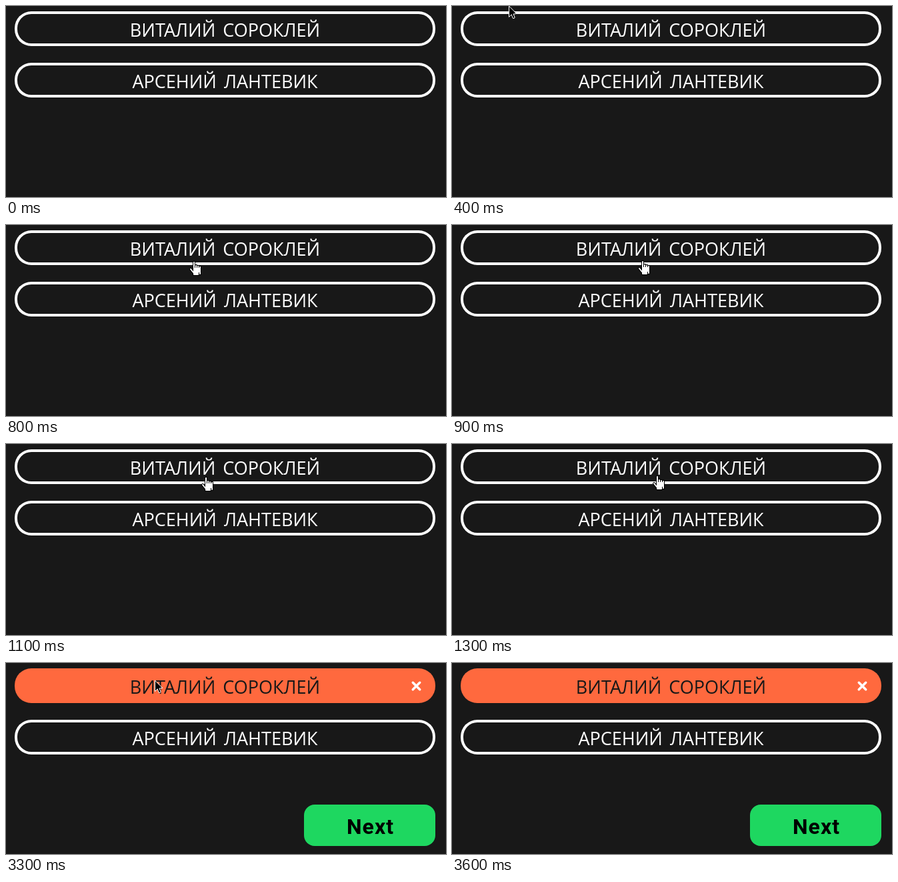
Recreate the animation shown at these times as an HTML page with a canvas. Size 660x286 px, loop 4000 ms.

```html
<!DOCTYPE html>
<html lang="ru">
<head>
<meta charset="utf-8">
<title>Quiz choice</title>
<style>
  html, body { margin: 0; width: 100%; height: 100%; overflow: hidden; background: #181818; }
  canvas { display: block; }
</style>
</head>
<body>
<canvas id="stage" width="660" height="286"></canvas>
<script>
const ctx = document.getElementById('stage').getContext('2d');
const LOOP = 4000, STEP = 100, PICKED = 1600;
const DARK = '#181818', WHITE = '#fff', BLACK = '#000', ORANGE = '#ff693e', GREEN = '#1ed760';

function fillBox(x, y, w, h, r, color) {
  ctx.beginPath();
  ctx.roundRect(x, y, w, h, r);
  ctx.fillStyle = color;
  ctx.fill();
}

function line(x1, y1, x2, y2, width, color) {
  ctx.beginPath();
  ctx.moveTo(x1, y1);
  ctx.lineTo(x2, y2);
  ctx.lineCap = 'round';
  ctx.lineWidth = width;
  ctx.strokeStyle = color;
  ctx.stroke();
}

function label(text, x, y, font, color) {
  ctx.font = font;
  ctx.fillStyle = color;
  ctx.textAlign = 'center';
  ctx.fillText(text, x, y);
}

function choice(text, y, picked) {
  fillBox(13, y, 631, 52, 25, picked ? ORANGE : WHITE);
  if (!picked) fillBox(17, y + 4, 623, 44, 21, DARK);
  ctx.wordSpacing = '4px';
  label(text, 328.5, y + 38, '500 27px "Open Sans", "Noto Sans", sans-serif', picked ? DARK : WHITE);
  ctx.wordSpacing = '0px';
}

function closeIcon(x, y, r) {
  line(x - r, y - r, x + r, y + r, 3.6, WHITE);
  line(x + r, y - r, x - r, y + r, 3.6, WHITE);
}

function nextButton() {
  fillBox(447, 212, 197, 62, 16, GREEN);
  ctx.letterSpacing = '1px';
  label('Next', 546.5, 256, 'bold 32px Roboto, sans-serif', BLACK);
  ctx.letterSpacing = '0px';
}

function arrow() {
  line(5.5, 12, 7.5, 17, 4, WHITE);
  ctx.beginPath();
  ctx.moveTo(.5, .5);
  ctx.lineTo(.5, 16.5);
  ctx.lineTo(4.5, 12.5);
  ctx.lineTo(11.5, 11.5);
  ctx.closePath();
  ctx.fillStyle = BLACK;
  ctx.fill();
  ctx.lineWidth = 1;
  ctx.strokeStyle = WHITE;
  ctx.stroke();
  line(5, 11, 7.5, 17, 2, BLACK);
}

const fingerTop = i => i ? 4 + i : 0;

function handShape(inset, color) {
  const part = (x, y, w, h) =>
    fillBox(x + inset, y + inset, w - 2 * inset, h - 2 * inset, 1, color);
  for (let i = 0; i < 4; i++) part(5 + 3 * i, fingerTop(i), 4, 14);
  part(5, 9, 12, 9);
  part(5, 13, 10, 9);
  line(2, 12, 6, 17, 4 - 2 * inset, color);
}

function hand() {
  ctx.translate(-5, 0);
  handShape(0, BLACK);
  handShape(1, WHITE);
  ctx.fillStyle = BLACK;
  for (let i = 1; i < 4; i++) ctx.fillRect(5 + 3 * i, fingerTop(i), 1, 10 - fingerTop(i));
}

const mix = (a, b, k) => a + (b - a) * k;
const easeOut = (k, power) => 1 - (1 - k) ** power;

// Hot spot of the pointer, or null while it is off the stage.
function pointerAt(t) {
  const part = (from, to) => Math.min(1, (t - from) / (to - from));
  if (t < 400 || t >= 3600) return null;
  if (t < 1000) {
    const k = easeOut(part(400, 900), 2.5);
    return [mix(85, 284, k), mix(0, 53, k) + 86 * k * (1 - k)];
  }
  if (t < 3300) {
    const k = easeOut(part(900, 1300), 1.5);
    return [mix(284, 306, k), mix(53, 47, k)];
  }
  const k = part(3300, 3500);
  return [mix(223, 138, k), mix(26, -8, k)];
}

function pointer(t, picked) {
  const spot = pointerAt(Math.floor(t / STEP) * STEP);
  if (!spot) return;
  const [x, y] = spot.map(Math.round);
  ctx.save();
  ctx.translate(x, y);
  if (picked || y < 8) arrow();
  else hand();
  ctx.restore();
}

function draw(now) {
  const t = now % LOOP;
  const picked = t >= PICKED;
  ctx.fillStyle = DARK;
  ctx.fillRect(0, 0, 660, 286);
  choice('ВИТАЛИЙ СОРОКЛЕЙ', 8, picked);
  choice('АРСЕНИЙ ЛАНТЕВИК', 85, false);
  if (picked) {
    closeIcon(615.5, 34.5, 5.2);
    nextButton();
  }
  pointer(t, picked);
}

const began = performance.now();
function tick() {
  draw(performance.now() - began);
  requestAnimationFrame(tick);
}
tick();
</script>
</body>
</html>
```
